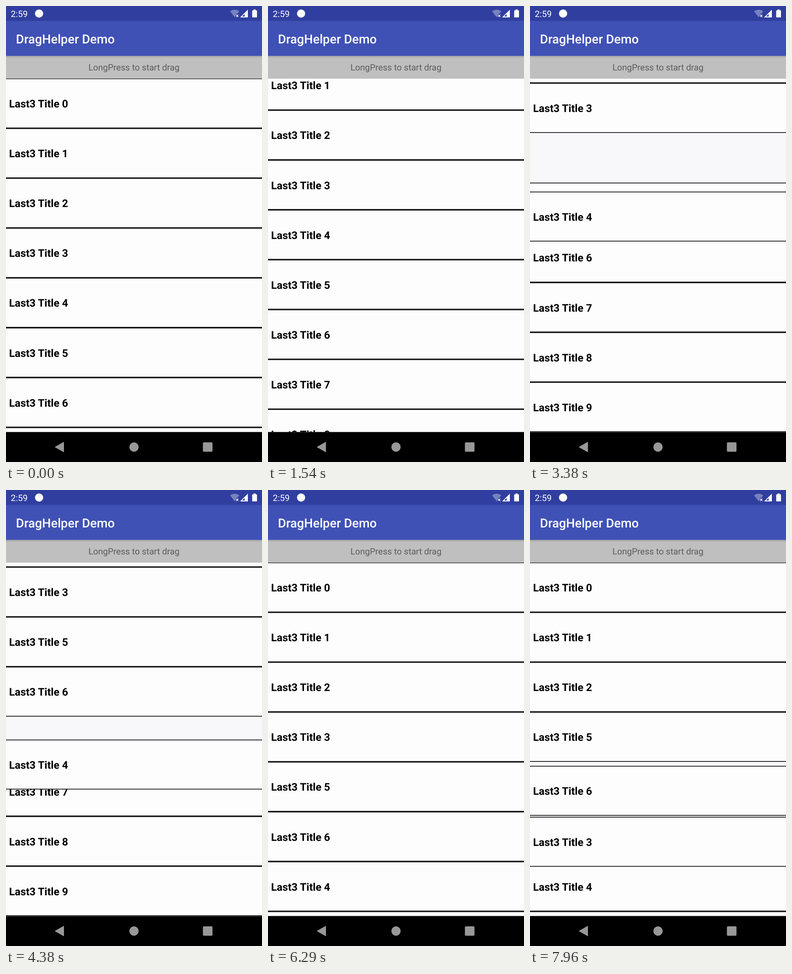
Animation of 561x998 px, one loop 8000 ms. Source, as an HTML page:

```html
<!DOCTYPE html>
<html lang="en">
<head>
<meta charset="utf-8">
<title>DragHelper Demo</title>
<style>
  html, body { margin: 0; width: 100%; height: 100%; overflow: hidden; background: #000; }
  svg { display: block; width: 100vw; height: 100vh; }
  text { font-family: Roboto, sans-serif; text-rendering: geometricPrecision; }
  .clock { font-size: 19.1px; fill: #fff; }
  .title { font-size: 27.3px; font-weight: 500; fill: #fff; }
  .hint { font-size: 19.1px; fill: #5c5c5c; text-anchor: middle; }
  .row text { font-size: 23.2px; font-weight: 700; fill: #000; }
</style>
</head>
<body>
<svg viewBox="0 0 561 998" preserveAspectRatio="none">
  <defs>
    <clipPath id="listArea"><rect y="158.4" width="561" height="774.1"/></clipPath>
    <linearGradient id="shade" x2="0" y2="1">
      <stop stop-opacity=".16"/>
      <stop offset="1" stop-opacity="0"/>
    </linearGradient>
  </defs>

  <rect y="100" width="561" height="840" fill="#f8f8fb"/>
  <g clip-path="url(#listArea)"><g id="list"></g></g>

  <rect y="109" width="561" height="49.4" fill="#bfbfbf"/>
  <rect y="109" width="561" height="5" fill="url(#shade)"/>
  <text class="hint" x="280.5" y="141.3">LongPress to start drag</text>

  <rect width="561" height="34" fill="#303f9f"/>
  <rect y="32.7" width="561" height="76.4" fill="#3f51b5"/>
  <text class="title" x="21.8" y="81.6">DragHelper Demo</text>
  <text class="clock" x="10.6" y="24">2:59</text>

  <g fill="#fff">
    <circle cx="72.5" cy="16.5" r="9"/>
    <path d="M491 11.5Q501 4.500 511 11.500L507 17H504V21L501 24.500Z" opacity=".35"/>
    <path d="M504.500 19L509 24M509 19L504.500 24" stroke="#fff" stroke-width="1.4"/>
    <path d="M530 8V25H513Z M523 17.500L517.500 23H523Z" fill-rule="evenodd"/>
    <path d="M542.500 7.500H547V9.500H549Q550 9.500 550 10.500V24Q550 25 549 25H540.500Q539.500 25 539.500 24V10.500Q539.500 9.500 540.500 9.500H542.500Z"/>
  </g>

  <rect y="932.5" width="561" height="66" fill="#000"/>
  <g fill="#989898">
    <path d="M107.500 965.300L126.500 954.500V976Z" stroke="#989898" stroke-linejoin="round"/>
    <circle cx="280.5" cy="965.3" r="10.2"/>
    <rect x="431.5" y="955" width="21" height="20.600" rx="2"/>
  </g>
</svg>
<script>
const LOOP = 8000, TOP = 158.5, PITCH = 109.1, BORDER = 1.56, MAX_SCROLL = 317.2;
const SHIFT_TIME = 250;

const linear = x => x;
const inOut = x => (1 - Math.cos(Math.PI * x)) / 2;

// Value at time t along [time, value, easing into this key] points.
function track(keys, t) {
  if (t <= keys[0][0]) return keys[0][1];
  for (let i = 1; i < keys.length; i++) {
    const [t0, v0] = keys[i - 1], [t1, v1, ease = linear] = keys[i];
    if (t < t1) return v0 + (v1 - v0) * ease((t - t0) / (t1 - t0));
  }
  return keys[keys.length - 1][1];
}

// Neighbours slide up one slot at each start time.
const slideUp = (...starts) => starts.flatMap((start, i) => [
  [start, -PITCH * i],
  [start + SHIFT_TIME, -PITCH * (i + 1), inOut]
]);

const scroll = [[1320, 0], [1780, MAX_SCROLL, inOut], [5920, MAX_SCROLL], [6290, 0, inOut]];

const offsets = {
  3: [[6980, 0], [7080, 18], [7400, 124], [7620, 195], [7757, 220], [7960, 229.5]],
  4: [[2780, 0], [2900, 14], [3380, 128.4], [3950, 224], [4380, 268.6], [4650, 268.6],
      [4900, 2 * PITCH, inOut]],
  5: slideUp(3375, 7370),
  6: slideUp(3930, 7757)
};

const list = document.getElementById('list');
const rows = [0, 1, 2, 5, 6, 7, 8, 9, 4, 3].map(index => {
  const el = document.createElementNS('http://www.w3.org/2000/svg', 'g');
  el.setAttribute('class', 'row');
  el.innerHTML = `<rect width="561" height="${PITCH}"/>
    <rect y="${BORDER}" width="561" height="${PITCH - 2 * BORDER}" fill="#fdfdfe"/>
    <text x="6.8" y="63.6">Last3 Title ${index}</text>`;
  list.append(el);
  return { el, home: TOP + PITCH * index, keys: offsets[index] };
});

function draw(now) {
  const t = now % LOOP;
  const scrolled = track(scroll, t);
  for (const { el, home, keys } of rows) {
    const y = home - scrolled + (keys ? track(keys, t) : 0);
    el.setAttribute('transform', `translate(0 ${y.toFixed(2)})`);
  }
}

const start = performance.now();
function tick() {
  draw(performance.now() - start);
  requestAnimationFrame(tick);
}
tick();
</script>
</body>
</html>
```
